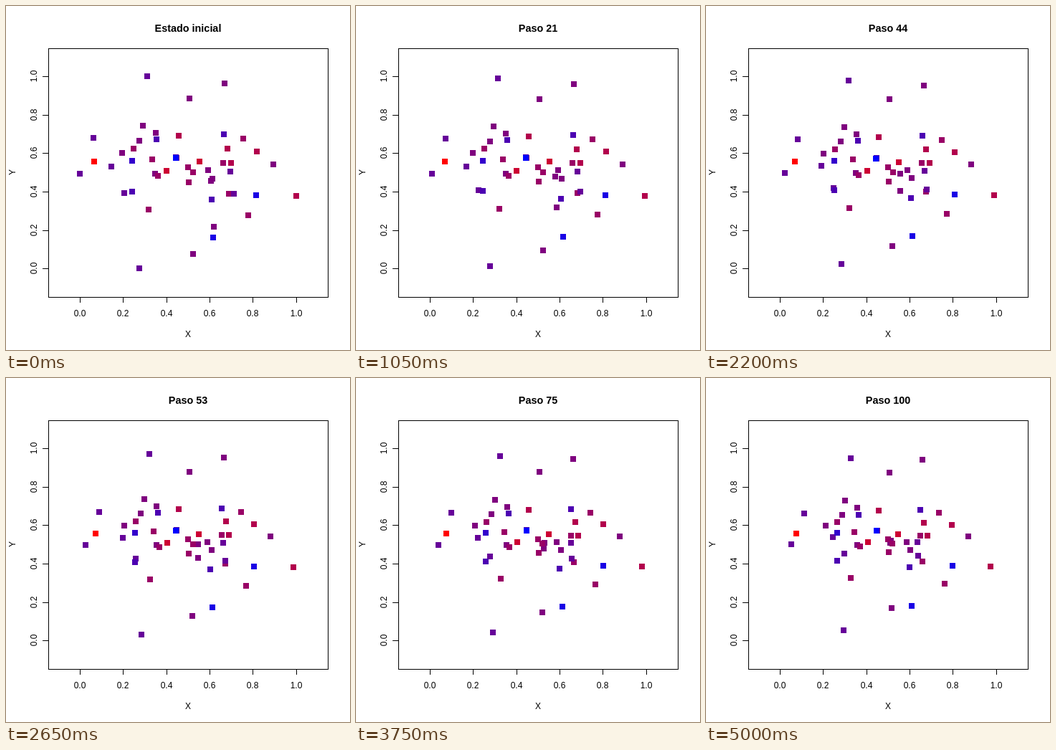
Recreate the animation shown at these times as an HTML page. Size 480x480 px, loop 5050 ms.

```html
<!DOCTYPE html>
<html lang="es">
<head>
<meta charset="utf-8">
<title>Partículas</title>
<style>
html, body { margin: 0; width: 100%; height: 100%; overflow: hidden; background: #fff; }
svg { display: block; width: 100vw; height: 100vh; }
text { font: 12px "Liberation Sans", Arial, sans-serif; text-anchor: middle; }
#title { font-size: 14.4px; font-weight: bold; }
#axes { fill: none; stroke: #000; }
#axes, #dots { shape-rendering: crispEdges; }
</style>
</head>
<body>
<svg viewBox="0 0 480 480">
  <path id="axes"/>
  <g id="labels"></g>
  <g id="dots"></g>
  <text id="title" x="254" y="36"></text>
</svg>
<script>
const STEP = 50, STEPS = 101;
const SOFT = 3; // keeps the pull finite between touching dots
const $ = id => document.getElementById(id);

function make(parent, tag, attrs) {
  const el = document.createElementNS('http://www.w3.org/2000/svg', tag);
  for (const k in attrs) el.setAttribute(k, attrs[k]);
  return parent.appendChild(el);
}

function label(x, y, text, turned) {
  const attrs = turned ? { transform: `translate(${x} ${y}) rotate(-90)` } : { x, y };
  make($('labels'), 'text', attrs).textContent = text;
}

// Plot box, ticks and labels
let axes = 'M59.5 59.5H449.5V406.5H59.5Z';
for (let i = 0; i <= 5; i++) {
  const x = Math.floor(103.66 + i * 60.296), y = Math.floor(366.87 - i * 53.63);
  const value = (i / 5).toFixed(1);
  axes += `M${x + 0.5} 407v7M59 ${y + 0.5}h-8`;
  label(x, 433, value);
  label(43, y, value, true);
}
$('axes').setAttribute('d', axes);
label(254, 462, 'X');
label(13, 232, 'Y', true);

const dots = [];

// Level runs from 0 (blue) to 10 (red); a light dot may have its own speed
function add(level, speed, ...places) {
  const red = Math.floor(level * 25.5), blue = Math.floor(255 - level * 25.5);
  for (const [x, y, own = speed] of places) {
    const el = make($('dots'), 'rect', { width: 8, height: 8, fill: `rgb(${red},0,${blue})` });
    dots.push({ el, speed: own, track: [{ x, y }] });
  }
}

add(10, 0.04, [123, 217]);
add(8, 0.09, [224, 230], [270, 217]);
add(5, 0.08, [305, 108], [256, 129, 0.04], [191, 167], [209, 177], [186, 188], [162, 205],
  [208, 234], [238, 212], [282, 229], [288, 241], [373, 221],
  [261, 346, 0.32], [286, 244, 1.5], [290, 308, 2.1]);
add(6, 0.09, [178, 199], [212, 237], [204, 214], [254, 225], [261, 232], [255, 246],
  [199, 284], [338, 292], [331, 185], [303, 219], [311, 262, 0.18]);
add(7, 0.09, [241, 181], [405, 265], [350, 203], [309, 199], [314, 219]);
add(4, 0.18, [197, 98], [122, 184], [103, 234], [186, 366],
  [147, 224, 0.43], [165, 261, 0.5], [313, 231, 0.35], [318, 262, 0.44]);
add(3, 0.12, [210, 186], [176, 259], [237, 211], [287, 270], [304, 179]);
add(2, 0.12, [176, 216]);
add(1, 0.07, [289, 323], [349, 264]);
add(0, 0.08, [237, 212]);

// Every dot is drawn with equal strength towards all the others
function pull(from, all) {
  let x = 0, y = 0;
  for (const to of all) {
    const dx = to.x - from.x, dy = to.y - from.y;
    const d = Math.hypot(dx, dy) + SOFT;
    x += dx / d;
    y += dy / d;
  }
  return { x: x / all.length, y: y / all.length };
}

for (let step = 1; step < STEPS; step++) {
  const now = dots.map(dot => dot.track[step - 1]);
  dots.forEach(({ speed, track }, i) => {
    const f = pull(now[i], now);
    track.push({ x: now[i].x + speed * f.x, y: now[i].y + speed * f.y });
  });
}

let shown = -1;
function draw(ms) {
  const step = Math.floor(ms / STEP) % STEPS;
  if (step === shown) return;
  shown = step;
  $('title').textContent = step ? `Paso ${step}` : 'Estado inicial';
  for (const { el, track } of dots) {
    el.setAttribute('x', Math.round(track[step].x) - 4);
    el.setAttribute('y', Math.round(track[step].y) - 4);
  }
}

const start = performance.now();
function tick() {
  draw(performance.now() - start);
  requestAnimationFrame(tick);
}
tick();
</script>
</body>
</html>
```
